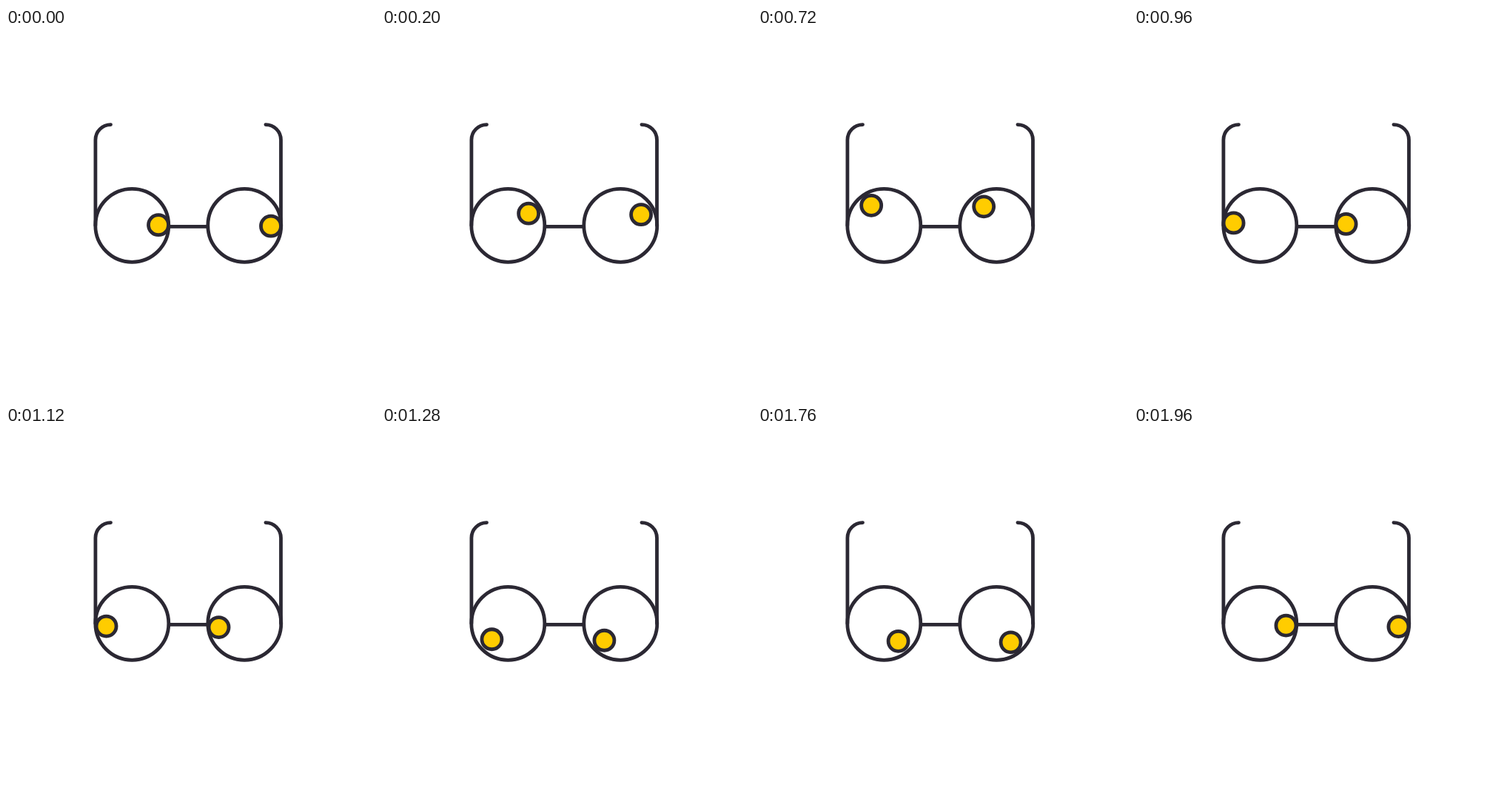
An HTML page with a canvas that plays this animation: 500 px wide and 500 px high, repeating every 2 s.

```html
<!DOCTYPE html>
<html lang="en">
<head>
<meta charset="utf-8">
<title>Rolling eyes</title>
<style>
html, body { margin: 0; width: 100%; height: 100%; overflow: hidden; background: #fff; }
canvas { display: block; width: 500px; height: 500px; }
</style>
</head>
<body>
<canvas id="stage" width="500" height="500"></canvas>
<script>
const ctx = document.getElementById('stage').getContext('2d');
const INK = '#2b2833', YELLOW = '#ffcc00';
const LOOP = 2000, STEP = 40, LEG = 510;

// The pupil visits right, top, left and bottom, easing on each leg.
const stops = [[206, 266.2], [170.2, 232], [134.4, 265.4], [170.1, 301.3]];
const at = i => stops[(i + 4) % 4];

// Tangent at a stop: a sixth of the way between its neighbours.
function tangent(i) {
  const a = at(i - 1), b = at(i + 1);
  return [(b[0] - a[0]) / 6, (b[1] - a[1]) / 6];
}

const legs = stops.map((p, i) => {
  const q = at(i + 1), s = tangent(i), e = tangent(i + 1);
  const path = document.createElementNS('http://www.w3.org/2000/svg', 'path');
  path.setAttribute('d', `M${p} C${p[0] + s[0]},${p[1] + s[1]} ${q[0] - e[0]},${q[1] - e[1]} ${q}`);
  return { path, length: path.getTotalLength() };
});

const ease = u => u * u * (3 - 2 * u);

function pupilAt(t) {
  const i = Math.floor(t / LEG);
  const { path, length } = legs[i];
  return path.getPointAtLength(length * ease(t / LEG - i));
}

function circle(x, y, r, fill) {
  ctx.beginPath();
  ctx.arc(x, y, r, 0, Math.PI * 2);
  if (fill) {
    ctx.fillStyle = fill;
    ctx.fill();
  }
  ctx.stroke();
}

function arm(x, dir) {
  ctx.beginPath();
  ctx.moveTo(x, 267);
  ctx.lineTo(x, 152);
  ctx.quadraticCurveTo(x, 152, x, 152);
  ctx.arcTo(x, 130.6, x + dir * 20.6, 130.6, 20.6);
  ctx.lineTo(x + dir * 20.6, 130.6);
  ctx.stroke();
}

function draw(t) {
  ctx.fillStyle = '#fff';
  ctx.fillRect(0, 0, 500, 500);
  ctx.strokeStyle = INK;
  ctx.lineWidth = 4.8;
  ctx.lineCap = 'round';

  arm(120.9, 1);
  arm(371.5, -1);
  ctx.beginPath();
  ctx.moveTo(221, 268.4);
  ctx.lineTo(272, 268.4);
  ctx.stroke();
  circle(170.3, 266.8, 49.5);
  circle(322.3, 266.8, 49.5);

  const p = pupilAt(t);
  circle(p.x, p.y, 13.5, YELLOW);
  circle(p.x + 152, p.y + 1.5, 13.5, YELLOW);
}

const start = performance.now();
function tick() {
  const t = (performance.now() - start) % LOOP;
  draw(Math.floor(t / STEP) * STEP);
  requestAnimationFrame(tick);
}
tick();
</script>
</body>
</html>
```
